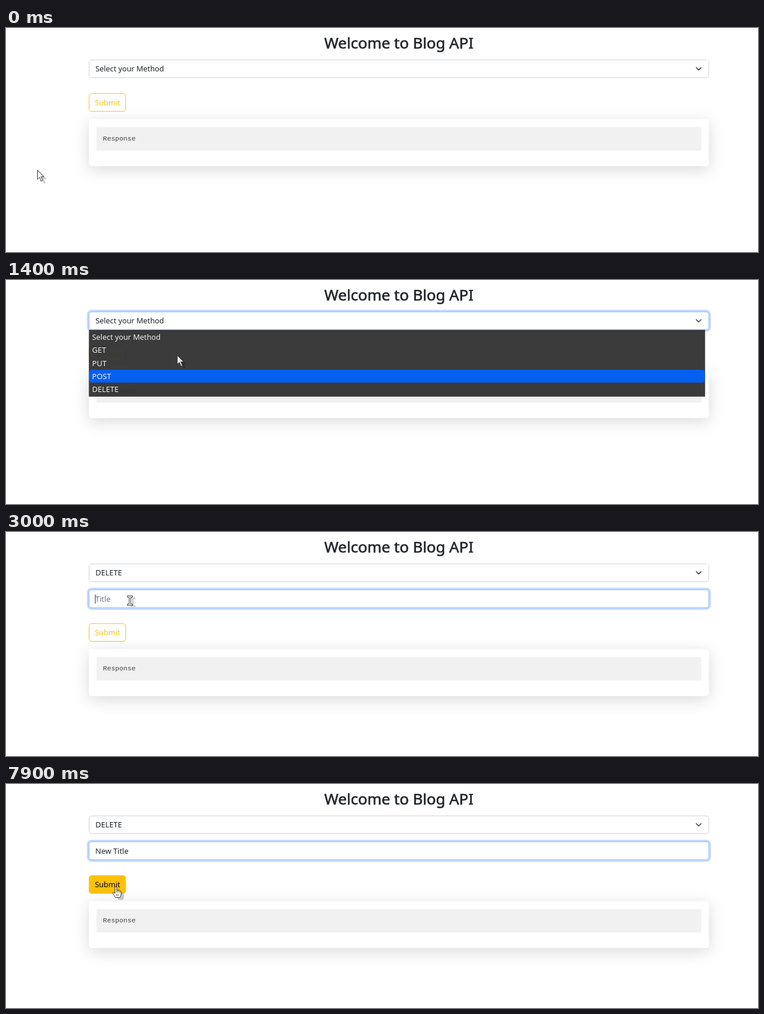
Animation, 1280 px wide and 382 px high, one loop 8 s. Source, as an HTML page:

```html
<!DOCTYPE html>
<html lang="en">
<head>
<meta charset="utf-8">
<title>Blog API</title>
<style>
  html, body { margin: 0; width: 100%; height: 100%; overflow: hidden; background: #fff; }
  svg { display: block; width: 100%; height: 100%; }
  text { font: 13px "Noto Sans", "Open Sans", sans-serif; fill: #212529; white-space: pre; }
  .heading { font-size: 26px; text-anchor: middle; stroke: #212529; stroke-width: .6px; }
  .long { font-size: 12.8px; }
  .response { font: 11.6px "Liberation Mono", monospace; fill: #444; }
  .ring { fill: #0d6efd; fill-opacity: .25; }
  .field { fill: #fff; stroke-width: .9px; }
  .card { fill: #fff; filter: drop-shadow(0 6.7px 13.3px rgba(0, 0, 0, .15)); }
  .menu text { fill: #f0f0f0; }
  .pointer .shadow { fill: #000; stroke: none; opacity: .2; filter: blur(.6px); }
  .pointer .body { fill: #fff; fill-opacity: .87; stroke: #383838; stroke-width: 1px; stroke-linejoin: round; }
</style>
</head>
<body>
<svg viewBox="0 0 1280 382">
  <defs>
    <path id="arrowShape" d="M.5 .5V16L4.2 12.6 6.8 19.3 9.4 18.2 6.7 11.6H11.5Z"/>
    <path id="beamShape" d="M-4.3 -8.3H-1.2L0 -7.5 1.2 -8.3H4.3V-5.8H1.3V5.8H4.3V8.3H1.2L0 7.5 -1.2 8.3H-4.3V5.8H-1.3V-5.8H-4.3Z"/>
    <path id="handShape" d="M-1.5 1.5Q0 -.5 1.5 1.5V7Q3 5.5 4 7.3 5.8 6 6.7 8 8.7 7.2 9 9.5V14Q8.5 17 7 19H-1Q-2.5 15.5 -5 12.5 -6 10 -3.6 10.3L-1.5 12.3Z"/>
  </defs>

  <text class="heading" x="668.7" y="35.2">Welcome to Blog API</text>

  <g id="select">
    <rect class="ring"/>
    <rect class="field" x="141.4" y="54.4" width="1054.8" height="30.4" rx="4.6"/>
    <text id="method" x="152.3" y="74.4"></text>
    <path d="M1174.8 67.5l4.2 4.2 4.2-4.2" fill="none" stroke="#343a40" stroke-width="1.5" stroke-linecap="round" stroke-linejoin="round"/>
  </g>

  <g id="input">
    <rect class="ring"/>
    <rect class="field" x="141.4" y="98.6" width="1054.8" height="30.4" rx="4.6"/>
    <text id="typed" x="152" y="118.8"></text>
    <rect id="caret" y="106.5" width="1" height="15.5" fill="#212529"/>
  </g>

  <g id="lower">
    <rect id="button" x="141.4" y="111.8" width="62.3" height="30.4" rx="4.6" stroke="#e9c02c"/>
    <text id="submit" x="151.2" y="131.8">Submit</text>
    <rect class="card" x="141" y="155.5" width="1055.5" height="80" rx="5"/>
    <rect x="154" y="169" width="1029.5" height="40" fill="#f1f1f1"/>
    <text class="response" x="165" y="191.8">Response</text>
  </g>

  <g id="menu" class="menu">
    <rect x="141.3" y="85.3" width="1048.4" height="113.4" fill="#303030" fill-opacity=".945" stroke="#000" stroke-opacity=".35" stroke-width=".9"/>
    <rect id="highlight" x="141.6" width="1047.8" height="22.2" rx="5" fill="#0560f2"/>
  </g>

  <g id="pointer" class="pointer">
    <use class="shadow"/>
    <use class="body"/>
    <path id="fingers" d="M1.5 7V10.5M4 7.5V10.5M6.7 8.2V10.8M1.5 13V16.5M4 13V16.5" fill="none" stroke="#383838" stroke-width=".8"/>
  </g>
</svg>

<script>
const LOOP = 8000;
const METHODS = ["Select your Method", "GET", "PUT", "POST", "DELETE"];
const ROW = 22.1;
const $ = id => document.getElementById(id);

// Each track lists [start in ms, value...]; a value holds until the next start.
const pointerTrack = [
  [0, "arrow", 53, 242], [100, "arrow", 72, 310], [200, "arrow", 130, 354],
  [300, "arrow", 212, 258], [400, "arrow", 258, 146], [600, "arrow", 270, 122],
  [700, "arrow", 293, 92], [800, "arrow", 307, 72], [1200, "arrow", 305, 82],
  [1300, "arrow", 299, 103], [1400, "arrow", 291, 128], [1500, "arrow", 284, 153],
  [1600, "arrow", 277, 173], [1700, "arrow", 272, 184], [1800, "arrow", 270, 188],
  [2300, "arrow", 258, 180], [2400, "arrow", 231, 160], [2600, "arrow", 217, 134],
  [2700, "beam", 211, 117], [7600, "beam", 209, 124], [7700, "arrow", 204, 146],
  [7800, "hand", 192, 168], [7900, "hand", 187, 174.5]
];
const menuTrack = [[0, -1], [1100, 0], [1300, 1], [1400, 3], [1500, 4], [2100, -1]];
const selectFocus = [[0, 0], [1100, .5], [1200, 1], [2900, .5], [3000, 0]];
const inputFocus = [[0, 0], [2900, .5], [3000, 1]];
const hoverTrack = [[0, 0], [7800, .5], [7900, 1]];
const typingTrack = [
  [0, ""], [3800, "N"], [4000, "Ne"], [4300, "New "], [4700, "New T"],
  [5100, "New Tt"], [5300, "New Ttl"], [5400, "New Ttle"], [5800, "New Ttl"],
  [6000, "New Tt"], [6500, "New T"], [6600, "New Ti"], [6700, "New Tit"],
  [6900, "New Titl"], [7000, "New Title"]
];

const at = (track, t) => track.findLast(step => step[0] <= t).slice(1);
const show = (el, on) => el.setAttribute("display", on ? "inline" : "none");
const set = (el, attrs) => Object.entries(attrs).forEach(([k, v]) => el.setAttribute(k, v));
const mix = (a, b, k) => `rgb(${a.map((v, i) => Math.round(v + (b[i] - v) * k))})`;

function setLabel(el, label) {
  el.textContent = label;
  el.classList.toggle("long", label === METHODS[0]);
}

function drawFocus(group, amount) {
  const field = group.querySelector(".field");
  const [x, y, w, h] = ["x", "y", "width", "height"].map(k => +field.getAttribute(k));
  const spread = 3.7 * amount;
  set(group.querySelector(".ring"), {
    x: x - spread, y: y - spread, width: w + 2 * spread, height: h + 2 * spread,
    rx: 4.6 + spread, opacity: amount
  });
  field.setAttribute("stroke", mix([200, 204, 208], [134, 183, 254], amount));
}

function drawInput(t) {
  const [value] = at(typingTrack, t);
  const typed = $("typed");
  typed.textContent = value || "Title";
  typed.style.fill = value ? "#212529" : "#6c757d";
  show($("caret"), t >= 2900 && t < 7600);
  $("caret").setAttribute("x", 151.5 + (value ? typed.getComputedTextLength() : 0));
}

function drawPointer(t) {
  const [kind, x, y] = at(pointerTrack, t);
  const pointer = $("pointer");
  pointer.setAttribute("transform", `translate(${x} ${y})`);
  const [shadow, body] = pointer.querySelectorAll("use");
  set(shadow, { href: `#${kind}Shape`, x: 5, y: kind === "beam" ? 2.5 : 4 });
  body.setAttribute("href", `#${kind}Shape`);
  show($("fingers"), kind === "hand");
}

function render(t) {
  const chosen = t >= 2300;
  setLabel($("method"), METHODS[chosen ? 4 : 0]);
  show($("input"), chosen);
  $("lower").setAttribute("transform", `translate(0 ${chosen ? 44.3 : 0})`);
  drawFocus($("select"), at(selectFocus, t)[0]);
  drawFocus($("input"), at(inputFocus, t)[0]);
  if (chosen) drawInput(t);

  const [row] = at(menuTrack, t);
  show($("menu"), row >= 0);
  $("highlight").setAttribute("y", 86.6 + Math.max(row, 0) * ROW);

  const [hover] = at(hoverTrack, t);
  set($("button"), { fill: "#ffc107", "fill-opacity": hover });
  $("button").setAttribute("stroke", mix([233, 192, 44], [255, 193, 7], hover));
  $("submit").style.fill = mix([240, 197, 40], [0, 0, 0], hover);
  drawPointer(t);
}

METHODS.forEach((name, i) => {
  const item = document.createElementNS("http://www.w3.org/2000/svg", "text");
  set(item, { x: 146.6, y: 102.3 + i * ROW });
  setLabel(item, name);
  $("menu").append(item);
});

const start = performance.now();
function tick() {
  render((performance.now() - start) % LOOP);
  requestAnimationFrame(tick);
}
tick();
</script>
</body>
</html>
```
